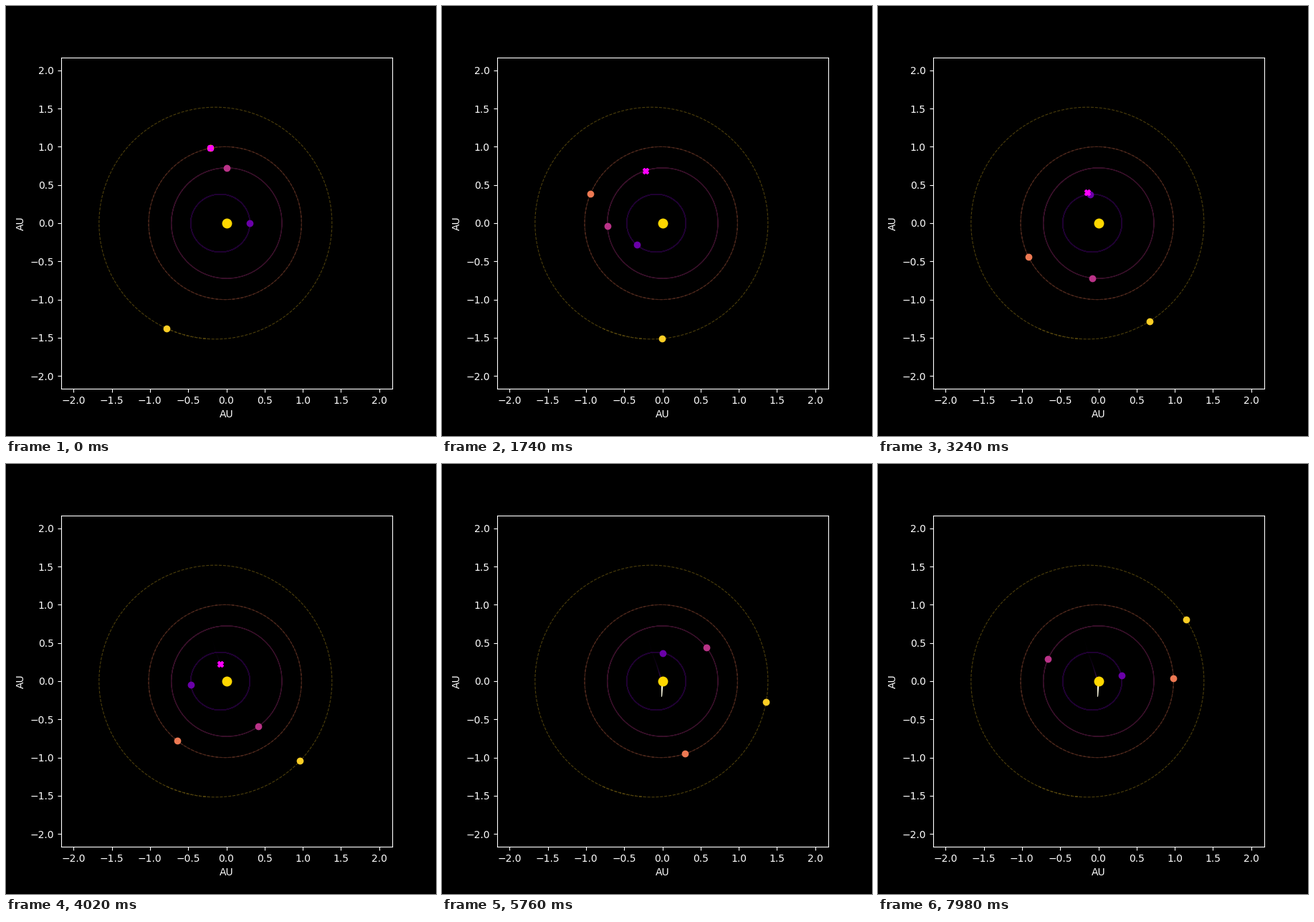
Write a matplotlib script that moves like this. It is 600 px wide and 600 px high and loops after 8000 ms.

```python
import numpy as np
import matplotlib.pyplot as plt
from matplotlib.animation import FuncAnimation
from matplotlib.collections import LineCollection

plt.style.use("dark_background")

LOOP_MS = 8000
DAYS = 267           # one simulated day per frame
ORBIT_DAYS = 730
YEAR = 365.25

# semi-major axis (AU), eccentricity (negative: aphelion on the right),
# mean anomaly at start (deg)
PLANETS = [
    (0.3871, 0.2056, 0),
    (0.7233, -0.005, 90),
    (1.0000, 0.0167, 100),
    (1.5237, 0.0934, 250),
]
COLORS = plt.cm.plasma(np.linspace(0.2, 0.9, len(PLANETS)))

# probe: fall to the sun, swing below it, drop back in
PASS_DAY, TURN_DAY = 150, 154
KEY_DAYS = [0, 58, 108, 135, PASS_DAY, TURN_DAY, 159, 163]
KEY_X = [-0.211, -0.219, -0.145, -0.075, -0.008, -0.008, 0.033, 0]
KEY_Y = [0.984, 0.681, 0.402, 0.216, 0, -0.195, -0.126, 0]


def kepler(planet, day):
    a, e, m0 = planet
    period = YEAR * a ** 1.5
    m = np.radians(m0) + 2 * np.pi * np.asarray(day, float) / period
    ecc = m + e * np.sin(m)
    for _ in range(8):
        ecc = ecc - (ecc - e * np.sin(ecc) - m) / (1 - e * np.cos(ecc))
    return a * (np.cos(ecc) - e), a * np.sqrt(1 - e * e) * np.sin(ecc)


def probe(day):
    return np.interp(day, KEY_DAYS, KEY_X), np.interp(day, KEY_DAYS, KEY_Y)


fig, ax = plt.subplots(figsize=(6, 6), dpi=100)
ax.set_aspect("equal")
a, e, _ = PLANETS[-1]
limit = 1.3 * a * (1 + e)
ticks = np.arange(-2, 2.1, 0.5)
ax.set(xlim=(-limit, limit), ylim=(-limit, limit), xlabel="AU", ylabel="AU",
       xticks=ticks, yticks=ticks)

dots = []
for planet, color in zip(PLANETS, COLORS):
    ax.plot(*kepler(planet, np.arange(ORBIT_DAYS)), "--", color=color,
            lw=0.8, alpha=0.3)
    dots += ax.plot([], [], "o", color=color, zorder=4)

# trail that only shows close to the sun
path = np.column_stack(probe(np.arange(PASS_DAY + 1)))
segments = np.stack([path[:-1], path[1:]], axis=1)
dist = np.hypot(*segments.mean(axis=1).T)
trail_colors = plt.cm.magma(np.full(len(dist), 0.25))
trail_colors[:, 3] = np.exp(-dist / 0.15)
trail = LineCollection([], lw=1, zorder=3)
ax.add_collection(trail)

wedge, = ax.fill([0], [0], color="#fffde4", lw=0, zorder=3)
craft, = ax.plot([], [], "X", color="magenta", zorder=5)
ax.plot(0, 0, "o", color="gold", ms=10, mew=0, zorder=6)


def update(day):
    for dot, planet in zip(dots, PLANETS):
        x, y = kepler(planet, day)
        dot.set_data([x], [y])
    x, y = probe(day)
    craft.set_data([x], [y])
    seen = min(day, PASS_DAY)
    trail.set_segments(segments[:seen])
    trail.set_color(trail_colors[:seen])
    grow = np.clip((day - PASS_DAY) / (TURN_DAY - PASS_DAY), 0, 1)
    tip = -0.205 * grow
    wedge.set_xy([(-0.014, 0), (0.012, 0), (-0.002, tip * 0.9),
                  (-0.006, tip), (-0.014, tip)])
    wedge.set_visible(bool(grow > 0))
    return [*dots, craft, trail, wedge]


anim = FuncAnimation(fig, update, frames=DAYS, interval=LOOP_MS / DAYS,
                     init_func=lambda: update(0), repeat=True, repeat_delay=0)
plt.show()
```
